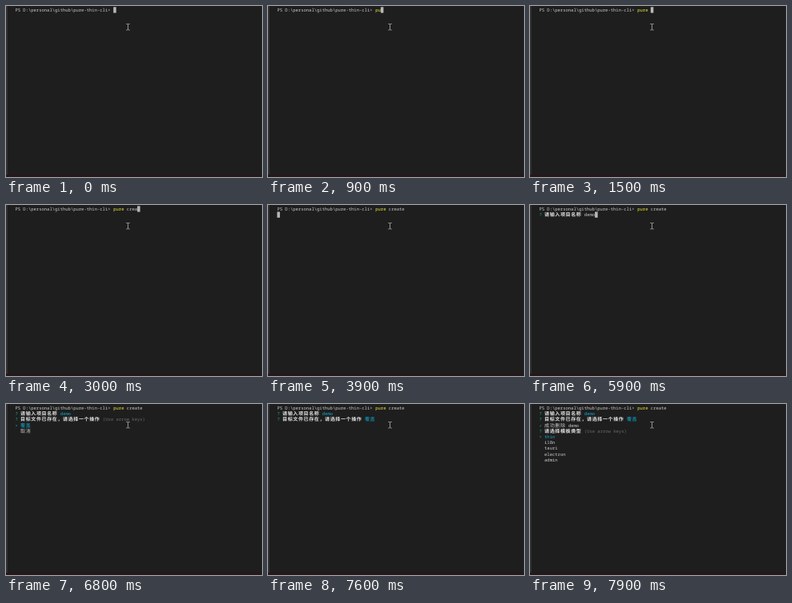
An HTML page that plays this animation: 320 px wide and 214 px high, repeating every 8 s.

```html
<!DOCTYPE html>
<html lang="zh">
<head>
<meta charset="utf-8">
<title>Terminal session</title>
<style>
  html, body { margin: 0; width: 100%; height: 100%; overflow: hidden; background: #1e1e1e; }
  svg { display: block; width: 100vw; height: 100vh; }
  text {
    font: 5.53px "Noto Sans Mono", "DejaVu Sans Mono", monospace;
    fill: #ccc; white-space: pre; text-rendering: geometricPrecision;
  }
  .cjk { font: 6.04px "Noto Sans CJK SC", "Noto Sans CJK", sans-serif; letter-spacing: .6px; }
  .bold { font-weight: 700; fill: #e5e5e5; }
  .yellow { fill: #f0f03c; }
  .cyan { fill: #11a8cd; }
  .green { fill: #0dbc79; }
  .dim { fill: #6a6a6a; }
</style>
</head>
<body>
<svg viewBox="0 0 320 214" preserveAspectRatio="none">
  <rect width="320" height="214" fill="#1e1e1e"/>
  <rect width="2" height="211" fill="#303030"/>
  <rect y="211" width="320" height="3" fill="#26171a"/>
  <g id="screen"></g>
  <rect id="caret" width="3.5" height="7.3" fill="#b8b8b8"/>
  <path d="M150.3 22.5h1.7l.5.5.5-.5h1.7M152.5 23v6.5M150.3 30h1.7l.5-.5.5.5h1.7"
        fill="none" stroke="#b5b5b5" stroke-width=".8"/>
</svg>
<script>
const LOOP = 8000, CELL = 3.32, LINE = 7.22, LEFT = 11.4, TOP = 1.3;
const PROMPT = 'PS D:\\personal\\github\\pure-thin-cli> ';
const HINT = '(Use arrow keys)';

const COMMAND = 'pure create';
const COMMAND_KEYS = [500, 900, 1000, 1200, 1400, 2400, 2800, 2900, 3000, 3200, 3300];
const NAME = 'demo';
const NAME_KEYS = [5500, 5600, 5800, 5900];
const ENTER = 3900, ASK_NAME = 4800, ASK_ACTION = 6800;
const CONFIRM = 7600, DELETED = 7700, ASK_TEMPLATE = 7800;

const screen = document.getElementById('screen');
const caret = document.getElementById('caret');
const typed = (text, keys, t) => text.slice(0, keys.filter(k => k <= t).length);
const isWide = text => /[\u3000-\u9fff]/.test(text);
const columns = text => [...text].reduce((n, c) => n + (isWide(c) || c === '，' ? 2 : 1), 0);

// A row is a list of [text, class] runs laid out on the character grid.
const question = (label, answer, style) =>
  [['? ', 'green'], [label, 'bold'], [' '], [answer, style]];
const choice = (text, selected) => selected ? [['> ', 'cyan'], [text, 'cyan']] : [['  '], [text]];

function rowsAt(t) {
  const command = typed(COMMAND, COMMAND_KEYS, t);
  const rows = [[[PROMPT], [command.slice(0, 4), 'yellow'], [command.slice(4)]]];
  if (t >= ENTER && t < ASK_NAME) rows.push([]);
  if (t >= ASK_NAME) {
    rows.push(question('请输入项目名称', typed(NAME, NAME_KEYS, t), t < ASK_ACTION ? '' : 'cyan'));
  }
  if (t >= ASK_ACTION) {
    const open = t < CONFIRM;
    rows.push(question('目标文件已存在，请选择一个操作', open ? HINT : '覆盖', open ? 'dim' : 'cyan'));
    if (open) rows.push(choice('覆盖', true), choice('取消'));
  }
  if (t >= DELETED) rows.push([['✓ ', 'green'], ['成功删除'], [' ' + NAME]]);
  if (t >= ASK_TEMPLATE) {
    rows.push(question('请选择模板类型', HINT, 'dim'));
    ['thin', 'i18n', 'tauri', 'electron', 'admin'].forEach((name, i) => rows.push(choice(name, i === 0)));
  }
  return rows;
}

function drawRun(text, style, col, row) {
  const node = document.createElementNS('http://www.w3.org/2000/svg', 'text');
  node.setAttribute('x', LEFT + col * CELL);
  node.setAttribute('y', TOP + row * LINE + 5.6);
  node.setAttribute('class', (style || '') + (isWide(text) ? ' cjk' : ''));
  node.textContent = text;
  screen.append(node);
}

let shown = '';
function render(t) {
  const rows = rowsAt(t);
  const key = JSON.stringify(rows);
  if (key === shown) return;
  shown = key;
  screen.replaceChildren();
  let col = 0;
  rows.forEach((runs, row) => {
    col = 0;
    for (const [text, style] of runs) {
      if (text.trim()) drawRun(text, style, col, row);
      col += columns(text);
    }
  });
  caret.setAttribute('x', LEFT + col * CELL);
  caret.setAttribute('y', TOP + (rows.length - 1) * LINE);
  caret.setAttribute('visibility', t < ASK_ACTION ? 'visible' : 'hidden');
}

const start = performance.now();
function tick() {
  render((performance.now() - start) % LOOP);
  requestAnimationFrame(tick);
}
tick();
</script>
</body>
</html>
```
